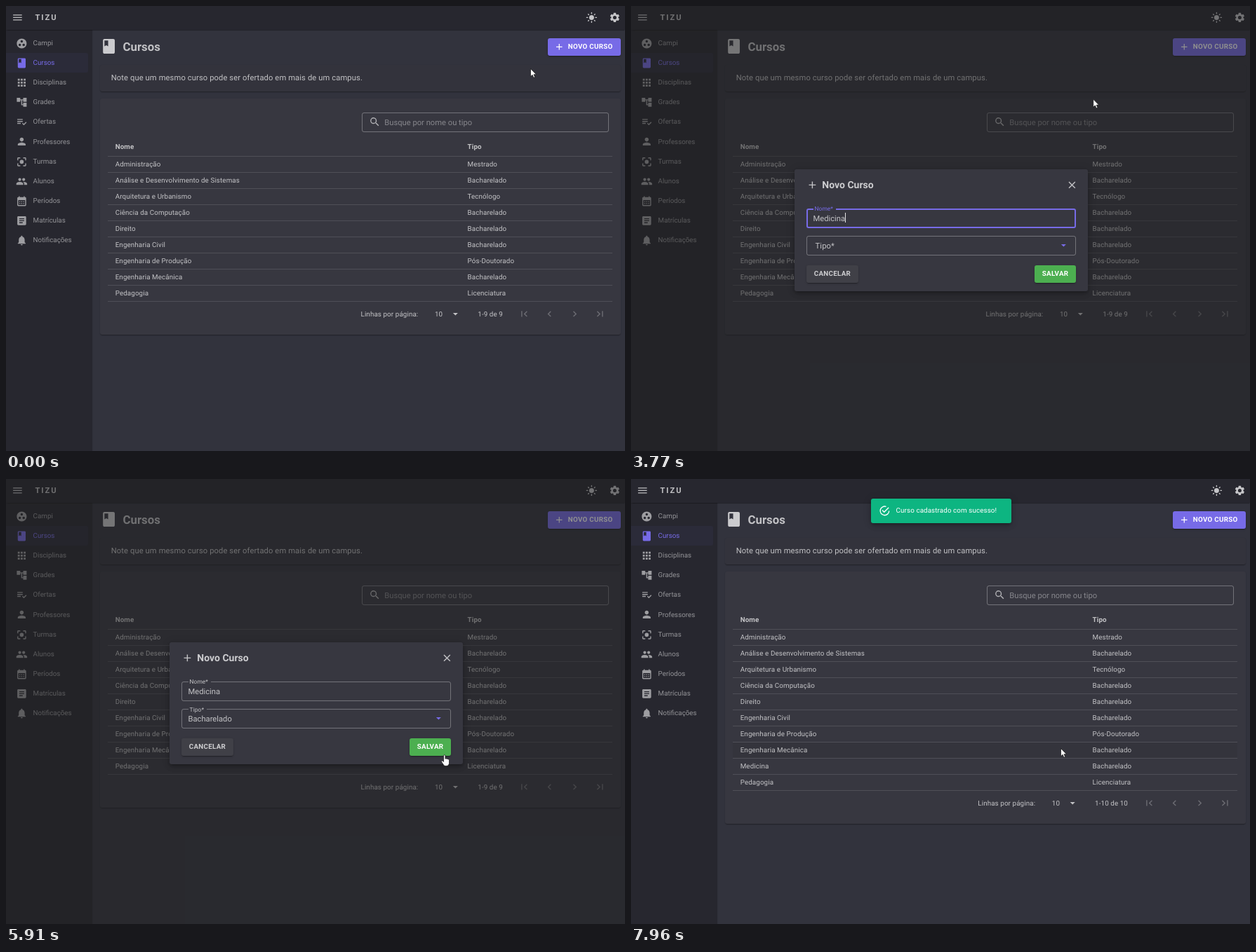
Recreate the animation shown at these times as an HTML page. Size 882 by 635 pixels, loop 8000 ms.

```html
<!DOCTYPE html>
<html lang="pt">
<head>
<meta charset="utf-8">
<title>Cursos</title>
<style>
html, body { margin: 0; width: 100%; height: 100%; overflow: hidden; background: #32333d; }
#stage { position: absolute; left: 0; top: 0; width: 882px; height: 635px; overflow: hidden; background: #32333d;
  font-family: Roboto, sans-serif; text-rendering: geometricPrecision; }
#stage div, #stage svg { position: absolute; box-sizing: border-box; }
#stage svg { fill-rule: evenodd; overflow: visible; }
#stage .layer { left: 0; top: 0; width: 882px; height: 635px; }
.text { line-height: 20px; white-space: pre; }
.flat { box-shadow: 0 1.4px .7px -.7px rgba(0,0,0,.2), 0 .7px .7px rgba(0,0,0,.14), 0 .7px 2.1px rgba(0,0,0,.12); }
.card { border-radius: 3px; }
.button { border-radius: 3px; overflow: hidden;
  box-shadow: 0 2.1px .7px -1.4px rgba(0,0,0,.2), 0 1.4px 1.4px rgba(0,0,0,.14), 0 .7px 3.5px rgba(0,0,0,.12); }
.raised { box-shadow: 0 2.1px 3.5px -.7px rgba(0,0,0,.2), 0 4.2px 7px rgba(0,0,0,.14), 0 .7px 12.6px rgba(0,0,0,.12); }
.field { border: 1px solid rgba(255,255,255,.3); border-radius: 3px; }
.field.hover { border-color: #adadb1; }
.field.focus { border: 2px solid #776be7; }
.ripple { width: 60px; height: 60px; border-radius: 50%; background: #fff; }
.caret { display: inline-block; width: 1px; height: 14px; background: #e4e4e6; vertical-align: middle; margin-top: -3px; }
</style>
</head>
<body>
<div id="stage"></div>
<script>
const LOOP = 8000;
const PRIMARY = '#776be7', SURFACE = '#373740', BAR = '#27272f';
const SOFT = 'rgba(255,255,255,.7)', MUTED = 'rgba(255,255,255,.5)', FAINT = 'rgba(255,255,255,.27)';

const ICONS = {
  menu: 'M3 18h18v-2H3v2zm0-5h18v-2H3v2zm0-7v2h18V6H3z',
  campus: 'M12 2C6.48 2 2 6.48 2 12s4.48 10 10 10 10-4.48 10-10S17.52 2 12 2zM8 17.5a2.5 2.5 0 1 1 0-5 2.5 2.5 0 0 1 0 5zM9.5 8a2.5 2.5 0 1 1 5 0 2.5 2.5 0 0 1-5 0zm6.5 9.5a2.5 2.5 0 1 1 0-5 2.5 2.5 0 0 1 0 5z',
  book: 'M18 2H6c-1.1 0-2 .9-2 2v16c0 1.1.9 2 2 2h12c1.1 0 2-.9 2-2V4c0-1.1-.9-2-2-2zM6 4h5v8l-2.5-1.5L6 12V4z',
  apps: 'M4 8h4V4H4zm6 12h4v-4h-4zm-6 0h4v-4H4zm0-6h4v-4H4zm6 0h4v-4h-4zm6-10v4h4V4zm-6 4h4V4h-4zm6 6h4v-4h-4zm0 6h4v-4h-4z',
  tree: 'M22 11V3h-7v3H9V3H2v8h7V8h2v10h4v3h7v-8h-7v3h-2V8h2v3z',
  list: 'M3 10h11v2H3zm0-4h11v2H3zm0 8h7v2H3zm17.59-2.07-4.25 4.24-2.12-2.12-1.41 1.41L16.34 19 22 13.34z',
  person: 'M12 12c2.21 0 4-1.79 4-4s-1.79-4-4-4-4 1.79-4 4 1.79 4 4 4zm0 2c-2.67 0-8 1.34-8 4v2h16v-2c0-2.66-5.33-4-8-4z',
  focus: 'M12 8a4 4 0 1 0 0 8 4 4 0 0 0 0-8zm-7 7H3v4c0 1.1.9 2 2 2h4v-2H5v-4zM5 5h4V3H5c-1.1 0-2 .9-2 2v4h2V5zm14-2h-4v2h4v4h2V5c0-1.1-.9-2-2-2zm0 16h-4v2h4c1.1 0 2-.9 2-2v-4h-2v4z',
  people: 'M16 11c1.66 0 2.99-1.34 2.99-3S17.66 5 16 5s-3 1.34-3 3 1.34 3 3 3zm-8 0c1.66 0 2.99-1.34 2.99-3S9.66 5 8 5 5 6.34 5 8s1.34 3 3 3zm0 2c-2.33 0-7 1.17-7 3.5V19h14v-2.5c0-2.33-4.67-3.5-7-3.5zm8 0c-.29 0-.62.02-.97.05 1.16.84 1.97 1.97 1.97 3.45V19h6v-2.5c0-2.33-4.67-3.5-7-3.5z',
  calendar: 'M19 4h-1V2h-2v2H8V2H6v2H5c-1.11 0-1.99.9-1.99 2L3 20c0 1.1.89 2 2 2h14c1.1 0 2-.9 2-2V6c0-1.1-.9-2-2-2zm0 16H5V10h14v10zM9 14H7v-2h2zm4 0h-2v-2h2zm4 0h-2v-2h2zm-8 4H7v-2h2zm4 0h-2v-2h2zm4 0h-2v-2h2z',
  article: 'M19 3H5c-1.1 0-2 .9-2 2v14c0 1.1.9 2 2 2h14c1.1 0 2-.9 2-2V5c0-1.1-.9-2-2-2zm-5 14H7v-2h7v2zm3-4H7v-2h10v2zm0-4H7V7h10v2z',
  bell: 'M12 22c1.1 0 2-.9 2-2h-4c0 1.1.89 2 2 2zm6-6v-5c0-3.07-1.64-5.64-4.5-6.32V4c0-.83-.67-1.5-1.5-1.5s-1.5.67-1.5 1.5v.68C7.63 5.36 6 7.92 6 11v5l-2 2v1h16v-1l-2-2z',
  gear: 'M19.14 12.94c.04-.3.06-.61.06-.94 0-.32-.02-.64-.07-.94l2.03-1.58c.18-.14.23-.41.12-.61l-1.92-3.32c-.12-.22-.37-.29-.59-.22l-2.39.96c-.5-.38-1.03-.7-1.62-.94l-.36-2.54c-.04-.24-.24-.41-.48-.41h-3.84c-.24 0-.43.17-.47.41l-.36 2.54c-.59.24-1.13.57-1.62.94l-2.39-.96c-.22-.08-.47 0-.59.22L2.74 8.87c-.12.21-.08.47.12.61l2.03 1.58c-.05.3-.09.63-.09.94s.02.64.07.94l-2.03 1.58c-.18.14-.23.41-.12.61l1.92 3.32c.12.22.37.29.59.22l2.39-.96c.5.38 1.03.7 1.62.94l.36 2.54c.05.24.24.41.48.41h3.84c.24 0 .44-.17.47-.41l.36-2.54c.59-.24 1.13-.56 1.62-.94l2.39.96c.22.08.47 0 .59-.22l1.92-3.32c.12-.22.07-.47-.12-.61l-2.01-1.58zM12 15.6a3.6 3.6 0 1 1 0-7.2 3.6 3.6 0 0 1 0 7.2z',
  search: 'M15.5 14h-.79l-.28-.27A6.5 6.5 0 1 0 13.73 14.43l.27.28v.79l5 4.99L20.49 19l-4.99-5zm-6 0a4.5 4.5 0 1 1 0-9 4.5 4.5 0 0 1 0 9z',
  first: 'M18.41 16.59L13.82 12l4.59-4.59L17 6l-6 6 6 6zM6 6h2v12H6z',
  prev: 'M15.41 7.41L14 6l-6 6 6 6 1.41-1.41L10.83 12z',
  next: 'M10 6L8.59 7.41 13.17 12l-4.58 4.59L10 18l6-6z',
  last: 'M5.59 7.41L10.18 12l-4.59 4.59L7 18l6-6-6-6zM16 6h2v12h-2z',
  down: 'M7 10l5 5 5-5z',
  plus: 'M19 13h-6v6h-2v-6H5v-2h6V5h2v6h6v2z',
  close: 'M19 6.41L17.59 5 12 10.59 6.41 5 5 6.41 10.59 12 5 17.59 6.41 19 12 13.41 17.59 19 19 17.59 13.41 12z',
  done: 'M20 12A8 8 0 1 1 12 4C12.76 4 13.5 4.11 14.2 4.31L15.77 2.74A10 10 0 1 0 22 12zM7.91 10.08L6.5 11.5L11 16L21 6L19.59 4.58L11 13.17z'
};

function box(parent, x, y, w, h, bg = '', cls = '') {
  const d = document.createElement('div');
  d.className = cls;
  d.style.cssText = `left:${x}px;top:${y}px;width:${w}px;height:${h}px;background:${bg}`;
  return parent.appendChild(d);
}
function layer(parent) {
  const d = document.createElement('div');
  d.className = 'layer';
  return parent.appendChild(d);
}
// y is the vertical middle of the capitals
function text(parent, x, y, str, { size = 9.8, color = SOFT, gap = .0107, weight = 400 } = {}) {
  const d = document.createElement('div');
  d.className = 'text';
  d.style.cssText = `left:${x}px;top:${y - 9.3}px;font-size:${size}px;color:${color};letter-spacing:${gap}em;font-weight:${weight}`;
  d.textContent = str;
  return parent.appendChild(d);
}
function svg(parent, x, y, w, h, view, body) {
  parent.insertAdjacentHTML('beforeend',
    `<svg style="left:${x}px;top:${y}px" width="${w}" height="${h}" viewBox="${view}">${body}</svg>`);
  return parent.lastElementChild;
}
function icon(parent, cx, cy, name, color = SOFT, size = 16.8) {
  return svg(parent, cx - size / 2, cy - size / 2, size, size, '0 0 24 24', `<path fill="${color}" d="${ICONS[name]}"/>`);
}
function ripple(parent, x, y) {
  const r = box(parent, x - 30, y - 30, 60, 60, '#fff', 'ripple');
  return (t, start) => {
    const p = prog(t, start, start + 420);
    r.style.opacity = t < start ? 0 : .22 * (1 - p);
    r.style.transform = `scale(${.2 + 1.6 * p})`;
  };
}
const prog = (t, a, b) => Math.min(1, Math.max(0, (t - a) / (b - a)));
const show = (el, on) => { el.style.visibility = on ? 'inherit' : 'hidden'; };
const CAPS = { weight: 600, gap: .0286, color: '#fff' };

const stage = document.getElementById('stage');
const page = layer(stage);

// Side menu and top bar
box(page, 0, 33, 123, 602, BAR, 'flat');
box(page, 0, 0, 882, 33.5, BAR, 'flat');
icon(page, 16.6, 16.8, 'menu');
text(page, 41.5, 16.5, 'TIZU', { size: 11.2, weight: 600, gap: .17 });
svg(page, 825.6, 8.4, 16.8, 16.8, '0 0 24 24',
  `<g fill="#c6c6c9" stroke="#c6c6c9" stroke-width="2" stroke-linecap="round"><circle cx="12" cy="12" r="5" stroke="none"/>
  <path d="M2 12h2M20 12h2M12 2v2M12 20v2M5.2 5.2l1.1 1.1M17.7 17.7l1.1 1.1M5.2 18.8l1.1-1.1M17.7 6.3l1.1-1.1"/></g>`);
icon(page, 867.2, 16.8, 'gear', '#c6c6c9');

box(page, 0, 67, 117, 28, 'rgba(119,107,231,.055)').style.borderRadius = '0 3px 3px 0';
[['campus', 'Campi'], ['book', 'Cursos'], ['apps', 'Disciplinas'], ['tree', 'Grades'], ['list', 'Ofertas'],
 ['person', 'Professores'], ['focus', 'Turmas'], ['people', 'Alunos'], ['calendar', 'Períodos'],
 ['article', 'Matrículas'], ['bell', 'Notificações']].forEach(([name, label], i) => {
  const y = 53 + 28.17 * i, on = i === 1;
  icon(page, 22.2, y, name, on ? PRIMARY : 'rgba(255,255,255,.55)');
  text(page, 38.6, y, label, { color: on ? PRIMARY : MUTED, gap: 0 });
});

// Heading
icon(page, 146.2, 57.3, 'book', '#cbcbce', 25.2);
text(page, 166.5, 58, 'Cursos', { size: 16.8, weight: 600, gap: 0 });
const newButton = box(page, 772, 46, 103.5, 25, PRIMARY, 'button');
const newRipple = ripple(newButton, 28, 13);
icon(newButton, 16, 12.5, 'plus', '#fff', 14.6);
text(newButton, 28.8, 12.5, 'NOVO CURSO', CAPS);
box(page, 134, 84, 741.5, 37.5, '#33333c', 'card flat');
text(page, 149.7, 102.5, 'Note que um mesmo curso pode ser ofertado em mais de um campus.', { size: 11.2, gap: .0094 });

// Table
const card = box(page, 134, 132, 741.5, 337, SURFACE, 'card flat');
const hoverRow = box(page, 145, 0, 719, 22, 'rgba(0,0,0,.06)');
box(page, 507, 152, 352, 28, '', 'field');
icon(page, 525.2, 165.6, 'search', 'rgba(255,255,255,.62)');
text(page, 539.3, 166, 'Busque por nome ou tipo', { size: 11.2, color: 'rgba(255,255,255,.4)', gap: 0 });

function row(parent, y, name, kind, weight = 400) {
  const r = layer(parent);
  text(r, 155.7, y, name, { weight });
  text(r, 657.6, y, kind, { weight });
  return r;
}
const rule = (parent, y) => box(parent, 145, y, 719, 1, 'rgba(255,255,255,.12)');
row(page, 201.3, 'Nome', 'Tipo', 600);
rule(page, 214);
const courses = [['Administração', 'Mestrado'], ['Análise e Desenvolvimento de Sistemas', 'Bacharelado'],
  ['Arquitetura e Urbanismo', 'Tecnólogo'], ['Ciência da Computação', 'Bacharelado'], ['Direito', 'Bacharelado'],
  ['Engenharia Civil', 'Bacharelado'], ['Engenharia de Produção', 'Pós-Doutorado'], ['Engenharia Mecânica', 'Bacharelado']];
courses.forEach(([name, kind], i) => {
  row(page, 226.3 + 23 * i, name, kind);
  rule(page, 237 + 23 * i);
});
const added = row(page, 410.3, 'Medicina', 'Bacharelado');
rule(added, 421);
const tail = layer(page);
row(tail, 410.3, 'Pedagogia', 'Licenciatura');
rule(tail, 421);
const perPage = layer(tail);
text(perPage, 505.5, 440.2, 'Linhas por página:');
text(perPage, 611, 440.2, '10');
icon(perPage, 640.3, 439.7, 'down');
const count = text(perPage, 672.3, 440.2, '');
['first', 'prev', 'next', 'last'].forEach((name, i) => icon(tail, 738.5 + 35.9 * i, 439.7, name, FAINT));

// Dialog
const shade = layer(stage);
shade.style.background = 'rgba(33,33,33,.5)';
const dialog = layer(stage);
dialog.style.transformOrigin = '442px 320px';
box(dialog, 233, 233, 418, 174, SURFACE, 'card raised');
icon(dialog, 258.3, 255, 'plus');
text(dialog, 272.3, 255.4, 'Novo Curso', { size: 14, weight: 600, gap: 0, color: '#cdcdd0' });
icon(dialog, 628.4, 255.6, 'close');

const nameField = box(dialog, 250, 289, 384, 28, '', 'field');
box(dialog, 260, 288, 31.5, 4, SURFACE);
const nameLabel = text(dialog, 261.5, 289.5, 'Nome*', { size: 8.4, gap: .0094 });
const nameValue = text(dialog, 259.5, 303, '', { size: 11.2, gap: 0 });
const typed = nameValue.appendChild(document.createElement('span'));
const caret = nameValue.appendChild(document.createElement('i'));
caret.className = 'caret';

const kindField = box(dialog, 250, 328, 384, 28, '', 'field');
const kindGap = box(dialog, 260, 327, 26, 4, SURFACE);
const kindLabel = text(dialog, 262.6, 342.3, 'Tipo*', { size: 11.2, gap: .0094 });
kindLabel.style.transformOrigin = '0 50%';
const kindValue = text(dialog, 259.5, 342, 'Bacharelado', { size: 11.2, gap: 0 });
icon(dialog, 616, 341.8, 'down', PRIMARY);

const cancel = box(dialog, 250, 370, 73.5, 25, '#404047', 'button');
text(cancel, 10.8, 12.5, 'CANCELAR', { ...CAPS, color: '#cfcfd2' });
const save = box(dialog, 575, 370, 59, 25, '#4caf50', 'button');
const saveRipple = ripple(save, 41, 15);
text(save, 10.8, 12.5, 'SALVAR', CAPS);

// Options
const menu = box(stage, 250, 328, 384, 175, SURFACE, 'raised');
menu.style.borderRadius = '0 0 3px 3px';
const options = ['Bacharelado', 'Licenciatura', 'Tecnólogo', 'Especialização', 'Mestrado', 'Doutorado', 'Pós-Doutorado']
  .map((label, i) => {
    const o = box(menu, 0, 25 * i, 384, 25);
    text(o, 10.7, 12.2, label, { color: '#cbcbce' });
    return o;
  });

// Confirmation
const toast = box(stage, 342, 28, 200, 35, '#0db581', 'card raised');
icon(toast, 19.2, 17.3, 'done', '#fff');
text(toast, 35.6, 17, 'Curso cadastrado com sucesso!', { color: '#fff' });

// Pointer
const pointer = box(stage, 0, 0, 0, 0);
const arrow = svg(pointer, -1, -1, 9, 14, '-.5 -.5 9 14',
  '<path fill="#fff" stroke="#111" stroke-width=".7" d="M0 0v11.2l2.6-2.4 1.7 4 1.9-.8-1.7-3.8h3.5z"/>');
const hand = svg(pointer, -4.8, -.5, 13, 17, '0 0 13 17',
  '<path fill="#fff" stroke="#111" stroke-width=".7" d="M3.6 10V1.5a1.2 1.2 0 0 1 2.4 0V6c.3-.9 2-.8 2.1.3.4-.8 1.8-.6 1.9.5.5-.6 1.6-.3 1.6.8v4c0 2.4-1.4 4.4-3.6 4.4H6.2c-1.4 0-2.3-.8-3-2L.7 10.2c-.7-1.2.8-2.2 1.7-1.2z"/>');

const PATH = [[0, 748, 90], [210, 748, 90], [400, 770, 76], [600, 797, 60], [760, 800, 59], [1700, 800, 59],
  [3570, 791, 70], [3770, 660, 133], [3970, 500, 250], [4150, 395, 322], [4300, 368, 346], [4460, 368, 346],
  [4700, 366, 362], [4950, 365, 352.8], [5150, 364, 346], [5270, 364, 346], [5500, 430, 362], [5750, 580, 390],
  [5910, 625, 393.5], [6030, 620, 386], [6120, 616, 385], [7709, 616, 385], [7710, 615, 385], [7749, 615, 385],
  [7750, 614, 385], [7959, 614, 385], [7960, 613, 385], [LOOP, 613, 385]];
const KEYS = [1740, 1910, 2110, 2280, 2400, 2530, 2810, 3570];
const OPEN = 840, PICK = 4460, PICKED = 5270, SAVE = 6330, CLOSE = 6640, RELOAD = 6810;

function position(t) {
  const i = Math.max(1, PATH.findIndex(p => p[0] > t));
  const [a, b] = [PATH[i - 1], PATH[i]], p = prog(t, a[0], b[0]);
  return [a[1] + (b[1] - a[1]) * p, a[2] + (b[2] - a[2]) * p];
}

function render(t) {
  const [x, y] = position(t);
  const over = (l, tp, r, b) => x >= l && x <= r && y >= tp && y <= b;
  const open = t >= OPEN && t < CLOSE;
  const picking = t >= PICK && t < PICKED;

  // Pointer
  const onNew = !open && over(772, 46, 876, 71);
  const onKind = open && over(250, 328, 634, 356);
  const onSave = open && over(575, 370, 634, 395);
  const pressable = onNew || onKind || onSave || picking;
  pointer.style.transform = `translate(${x}px,${y}px)`;
  show(pointer, t < 1700 || t >= 3570);
  show(arrow, !pressable);
  show(hand, pressable);
  newButton.style.background = onNew ? '#6a5ee0' : PRIMARY;
  newRipple(t, 740);
  show(hoverRow, !open && over(145, 215, 864, 421));
  hoverRow.style.top = 215 + 23 * Math.floor((y - 215) / 23) + 'px';

  // Dialog
  const grow = prog(t, OPEN, OPEN + 150), eased = 1 - (1 - grow) ** 2;
  show(shade, open);
  show(dialog, open);
  shade.style.opacity = dialog.style.opacity = grow;
  dialog.style.transform = grow < 1 ? `scale(${.8 + .2 * eased})` : 'none';

  // Name field
  const focused = t < PICK, n = KEYS.filter(k => k <= t).length;
  nameField.className = focused ? 'field focus' : 'field';
  nameLabel.style.color = focused ? PRIMARY : SOFT;
  typed.textContent = 'Medicina'.slice(0, n);
  const since = t - (n ? KEYS[n - 1] : 1200);
  show(caret, open && focused && since >= 0 && since % 1050 < (n ? 525 : 500));

  // Kind field
  const lift = prog(t, PICK, PICK + 160);
  kindField.className = onKind ? 'field hover' : 'field';
  show(kindGap, open && lift > .5);
  kindLabel.style.transform = `translate(${-1.1 * lift}px,${-13.7 * lift}px) scale(${1 - .25 * lift})`;
  show(kindValue, open && t >= PICKED);
  const fade = Math.min(prog(t, PICK, PICK + 120), 1 - prog(t, PICKED, PICKED + 160));
  show(menu, fade > 0);
  menu.style.opacity = fade;
  const hot = Math.floor((y - 328) / 25);
  options.forEach((o, i) => { o.style.background = i === hot ? '#424249' : 'transparent'; });
  saveRipple(t, SAVE);

  // Table and confirmation
  const full = t >= RELOAD, drop = full ? 23 : 0;
  show(added, full);
  tail.style.transform = `translateY(${drop}px)`;
  perPage.style.transform = full ? 'translateX(-11.2px)' : 'none';
  count.textContent = full ? '1-10 de 10' : '1-9 de 9';
  card.style.height = 337 + drop + 'px';
  toast.style.opacity = prog(t, 6660, 6890);
}

const start = performance.now();
function tick() {
  render((performance.now() - start) % LOOP);
  requestAnimationFrame(tick);
}
tick();
</script>
</body>
</html>
```
